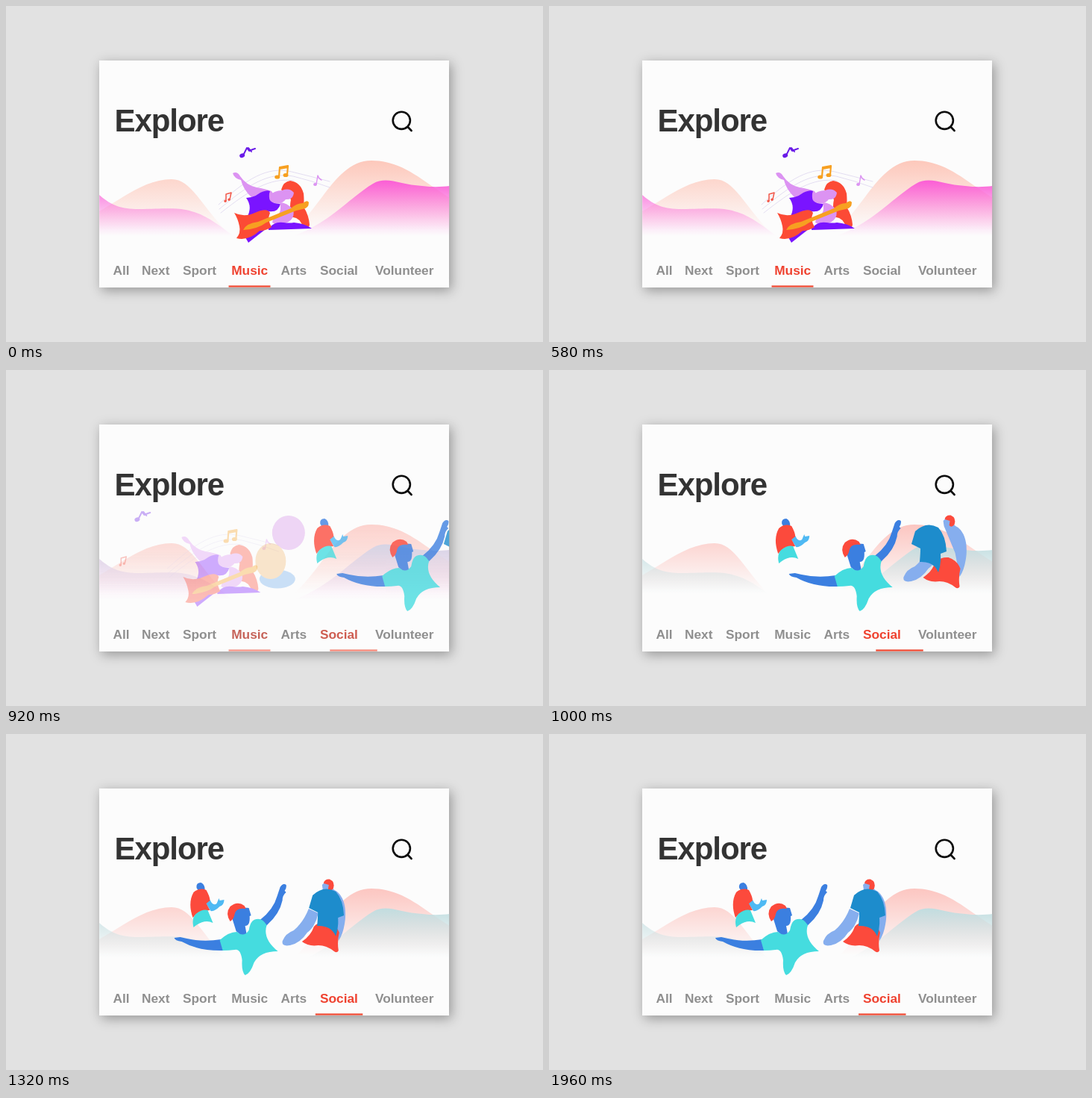
Recreate the animation shown at these times as an HTML page. Size 720 by 450 pixels, loop 1.98 s.

```html
<!DOCTYPE html>
<html lang="en">
<head>
<meta charset="utf-8">
<title>Explore</title>
<style>
  html, body { margin: 0; width: 100%; height: 100%; overflow: hidden; background: #e2e2e2; }
  .card {
    position: absolute; left: 125.2px; top: 73px; width: 469px; height: 304.3px;
    background: #fcfcfc; box-shadow: 3px 4px 15px rgba(0, 0, 0, .34);
  }
  svg { position: absolute; left: 0; top: 0; display: block; }
  text { font-family: "Liberation Sans", Arial, sans-serif; font-weight: bold; }
  .title { font-size: 42px; letter-spacing: -1.1px; fill: #333; }
  .tabs { font-size: 17.3px; fill: #8f8f8f; }
  .line { fill: none; stroke-linecap: round; stroke-linejoin: round; }
</style>
</head>
<body>
<div class="card"></div>
<svg width="720" height="450" viewBox="0 0 720 450">
  <defs>
    <clipPath id="clip"><rect x="125.2" y="73" width="469" height="304.3"/></clipPath>
    <linearGradient id="peach" gradientUnits="userSpaceOnUse" x1="0" y1="207" x2="0" y2="300">
      <stop stop-color="#fdc8bb"/><stop offset="1" stop-color="#fdc8bb" stop-opacity="0"/>
    </linearGradient>
    <linearGradient id="pink" gradientUnits="userSpaceOnUse" x1="0" y1="233" x2="0" y2="308">
      <stop stop-color="#fb5cd6"/><stop offset="1" stop-color="#fb7fe0" stop-opacity="0"/>
    </linearGradient>
    <linearGradient id="rose" gradientUnits="userSpaceOnUse" x1="0" y1="207" x2="0" y2="296">
      <stop stop-color="#fcc6c1"/><stop offset="1" stop-color="#fcc6c1" stop-opacity="0"/>
    </linearGradient>
    <linearGradient id="teal" gradientUnits="userSpaceOnUse" x1="0" y1="233" x2="0" y2="300">
      <stop stop-color="#c0dde0"/><stop offset="1" stop-color="#d3e4e6" stop-opacity="0"/>
    </linearGradient>
    <path id="back" d="M125 275C158 256 188 232 222 232C250 232 262 270 302 308H125ZM374 308C420 280 440 207 490 207C533 207 560 236 595 257V308Z"/>
    <path id="front" d="M125 253C141 267 154 272 178 272C208 272 222 270 241 273C266 278 282 291 305 308H125ZM385 308C432 292 463 255 492 238C511 227 529 240 558 241C574 243 585 242 595 241V308Z"/>
  </defs>

  <g clip-path="url(#clip)">
    <g id="warm"><use href="#back" fill="url(#peach)"/><use href="#front" fill="url(#pink)"/></g>
    <g id="cool"><use href="#back" fill="url(#rose)"/><use href="#front" fill="url(#teal)"/></g>

    <g id="music">
      <g id="player">
        <g class="line" stroke="#d8d0ec" stroke-width=".7">
          <path d="M285 266C322 232 350 214 383 222Q408 228 434 235"/>
          <path d="M286 272C324 240 351 222 385 228Q410 234 434 243"/>
          <path d="M288 277C326 247 354 229 386 234"/>
        </g>
        <g class="line" stroke="#f7a021" stroke-width="2.2">
          <path d="M366 229L367 216L378 214L377 226M367 218L378 216"/>
          <g fill="#f7a021"><ellipse cx="363.7" cy="229" rx="2.4" ry="1.5"/><ellipse cx="375" cy="226.5" rx="2.4" ry="1.5"/></g>
        </g>
        <g class="line" stroke="#dc93f2" stroke-width="1.4">
          <path d="M416 239L418 227Q419 231 423 233"/><ellipse cx="414.5" cy="239" rx="1.7" ry="1.4" fill="#dc93f2"/>
        </g>
        <path fill="#fc4a35" d="M369 246Q372 235 381 234Q395 236 399 251Q400 261 399 269Q406 280 407 293Q406 299 399 297Q393 282 384 283Q379 274 382 259Z"/>
        <path fill="#dc93f2" d="M304 224Q310 221 314 228Q322 240 336 243Q348 245 356 248Q362 255 352 262L330 257Q318 246 315 233Q306 231 304 224Z"/>
        <path fill="#7a14ff" d="M322 257Q332 257 341 250Q350 246 354 248Q350 258 360 264L368 265Q365 277 352 275L323 283Q331 269 322 257Z"/>
        <path fill="#dc93f2" d="M353 254Q360 247 370 247Q380 243 386 250Q385 260 375 259Q370 266 360 264Q352 262 353 254Z"/>
        <path fill="#dc93f2" d="M367 263Q377 263 385 273Q388 284 377 290Q365 295 357 290L359 282Q371 280 367 263Z"/>
        <path fill="#7a14ff" d="M352 298Q360 288 372 290Q380 291 386 290Q400 291 410 298Q383 299 352 300ZM321 310Q332 302 348 299Q335 309 325 317Z"/>
        <path fill="#fc4a35" d="M306 277Q320 284 336 276Q350 270 354 277Q350 286 356 296Q349 301 340 301Q325 315 309 311Q315 304 313 295Q311 285 306 277Z"/>
        <path fill="#f7a021" d="M318 300Q322 291 338 289L382 271Q390 264 398 264Q404 259 406 263Q406 271 398 272L389 274L349 290Q337 299 318 300Z"/>
      </g>
      <g id="notes" class="line">
        <g stroke="#6a1be8" stroke-width="2">
          <path d="M318 200L323 190L326 194L331 192L334 191M325 190L329 195"/>
          <ellipse cx="316.5" cy="200.5" rx="2.6" ry="1.8" fill="#6a1be8" transform="rotate(-25 316 200)"/>
        </g>
        <g stroke="#f2594b" stroke-width="1.5">
          <path d="M295 261L295 252L302 250L300 259"/>
          <g fill="#f2594b"><circle cx="294" cy="261.3" r="1"/><circle cx="299" cy="259.3" r="1"/></g>
        </g>
      </g>
    </g>

    <g id="arts">
      <ellipse cx="588" cy="280" rx="24" ry="12.5" fill="#3f92e8"/>
      <ellipse cx="603" cy="218" rx="22" ry="23" fill="#c668e0"/>
      <ellipse cx="579" cy="256" rx="20.5" ry="24" fill="#efa545"/>
    </g>

    <g id="social">
      <g id="friend">
        <path fill="#3b7fe0" d="M255 206Q254 199 261 199Q267 202 266 210L258 211Z"/>
        <path fill="#4fb9f3" d="M267 226L273 222Q277 231 282 227L285 220L286 223L292 222Q292 229 286 231Q279 238 274 237Z"/>
        <path fill="#fc4a3c" d="M251 212Q259 205 268 209Q273 218 273 223L268 227L273 236Q258 236 250 246Q243 226 251 212Z"/>
        <path fill="#45dcdf" d="M251 259Q248 247 254 241Q263 234 270 236L277 253Q265 247 251 259Z"/>
      </g>
      <g id="guest">
        <path fill="#86aeee" d="M421 202Q424 197 433 202Q434 208 441 211Q454 222 452 248Q450 267 443 277L437 245L422 209Z"/>
        <path fill="#86aeee" d="M403 234L416 240Q412 258 401 266Q392 280 378 283Q366 285 368 277Q372 267 383 263Q396 252 403 234Z"/>
        <path fill="#fc4a3c" d="M423 200Q424 194 431 194.5Q439 198 436 207Q432 212 429 208L430 202Z"/>
        <path fill="#fc4a3c" d="M394 278Q406 270 410 258Q417 250 428 251Q440 255 444 266Q441 278 443 290Q441 294 437 291Q427 283 416 283Q403 285 394 278Z"/>
      </g>
      <path id="shirt" fill="#1d8ccc" d="M409 216Q424 202 440 211Q450 222 451 243L443 246Q444 260 440 271Q434 256 415 257Q416 246 416 239L404 233Z"/>
      <g id="dancer">
        <path fill="#3b7fe0" d="M286 275Q262 279 240 274L231 272L223 273Q224 277 233 278Q256 291 289 290Z"/>
        <path fill="#3b7fe0" d="M338 249Q356 235 361 217L365 205Q369 199 373 202Q374 206 371 210L373 212Q368 216 368 223Q364 242 346 257Z"/>
        <path fill="#3b7fe0" d="M303 238Q308 231 323 233L326 243L324 244Q325 257 318 257L320 268L313 270L306 264L301 248Z"/>
        <path fill="#fc4a3c" d="M298 251Q291 240 298 231Q308 223 317 230L319 234Q306 232 304 241Q303 248 298 251Z"/>
        <path fill="#45dcdf" d="M284 276Q296 265 307 265Q316 273 323 263Q325 249 333 248Q341 246 347 256Q341 274 362 291Q338 291 330 306Q325 321 318 323Q313 318 314 303Q312 287 304 289Q296 290 288 290Z"/>
      </g>
    </g>

    <rect id="oldBar" x="298.5" y="374.4" width="56" height="2.2" fill="#ee452e"/>
    <rect id="bar" x="298" y="374.4" width="63.5" height="2.2" fill="#ee452e"/>
  </g>

  <text class="title" x="145.6" y="168">Explore</text>
  <g class="line" stroke="#0c0c0c" stroke-width="2.6">
    <circle cx="530.3" cy="153.3" r="11.6"/><path d="M538.8 162L543.6 167"/>
  </g>
  <g class="tabs">
    <text x="143.5" y="359.5">All</text>
    <text x="182" y="359.5">Next</text>
    <text x="237" y="359.5">Sport</text>
    <text id="oldTab" x="302.2" y="359.5">Music</text>
    <text x="368.5" y="359.5">Arts</text>
    <text id="newTab" x="421" y="359.5">Social</text>
    <text x="495" y="359.5">Volunteer</text>
  </g>
</svg>
<script>
  const LOOP = 1980, START = 745;
  const GREY = [143, 143, 143], RED = [239, 66, 48];
  const $ = id => document.getElementById(id);
  const clamp = v => Math.min(1, Math.max(0, v));
  const shift = (id, x) => $(id).setAttribute("transform", `translate(${x.toFixed(2)} 0)`);
  const fade = (id, v) => $(id).setAttribute("opacity", clamp(v).toFixed(3));
  const mix = (a, b, p) => `rgb(${a.map((v, i) => Math.round(v + (b[i] - v) * p))})`;

  // Remaining distance of a critically damped slide
  const slide = (t, dist, k = .0135) => dist * (1 + k * t) * Math.exp(-k * t);

  // Progress of an underdamped spring
  function spring(t) {
    const w = Math.PI / 220, damp = .468;
    return 1 - Math.exp(-w * damp * t) * (Math.cos(w * t) + damp * Math.sin(w * t));
  }

  function draw(now) {
    const time = now % LOOP;
    const t = Math.max(0, time - START);
    const p = clamp((time - 800) / 185);

    fade("warm", 1 - p);
    fade("cool", p);

    const exit = -20 * (t / 95) ** 2;
    shift("player", exit);
    shift("notes", exit * 2.05);
    fade("music", 1 - p);

    shift("arts", slide(t, 702) - slide(95, 702));
    fade("arts", t ? (950 - time) / 110 : 0);

    shift("friend", slide(t, 830, .017));
    shift("dancer", slide(t, 702));
    shift("guest", slide(t, 765));
    shift("shirt", slide(t, 583));
    fade("social", p * 1.2);

    shift("bar", 117 * spring(t));
    fade("bar", p);
    fade("oldBar", 1 - p * p);
    $("oldTab").style.fill = mix(RED, GREY, p * p);
    $("newTab").style.fill = mix(GREY, RED, p);
  }

  function tick() {
    draw(performance.now());
    requestAnimationFrame(tick);
  }
  tick();
</script>
</body>
</html>
```
